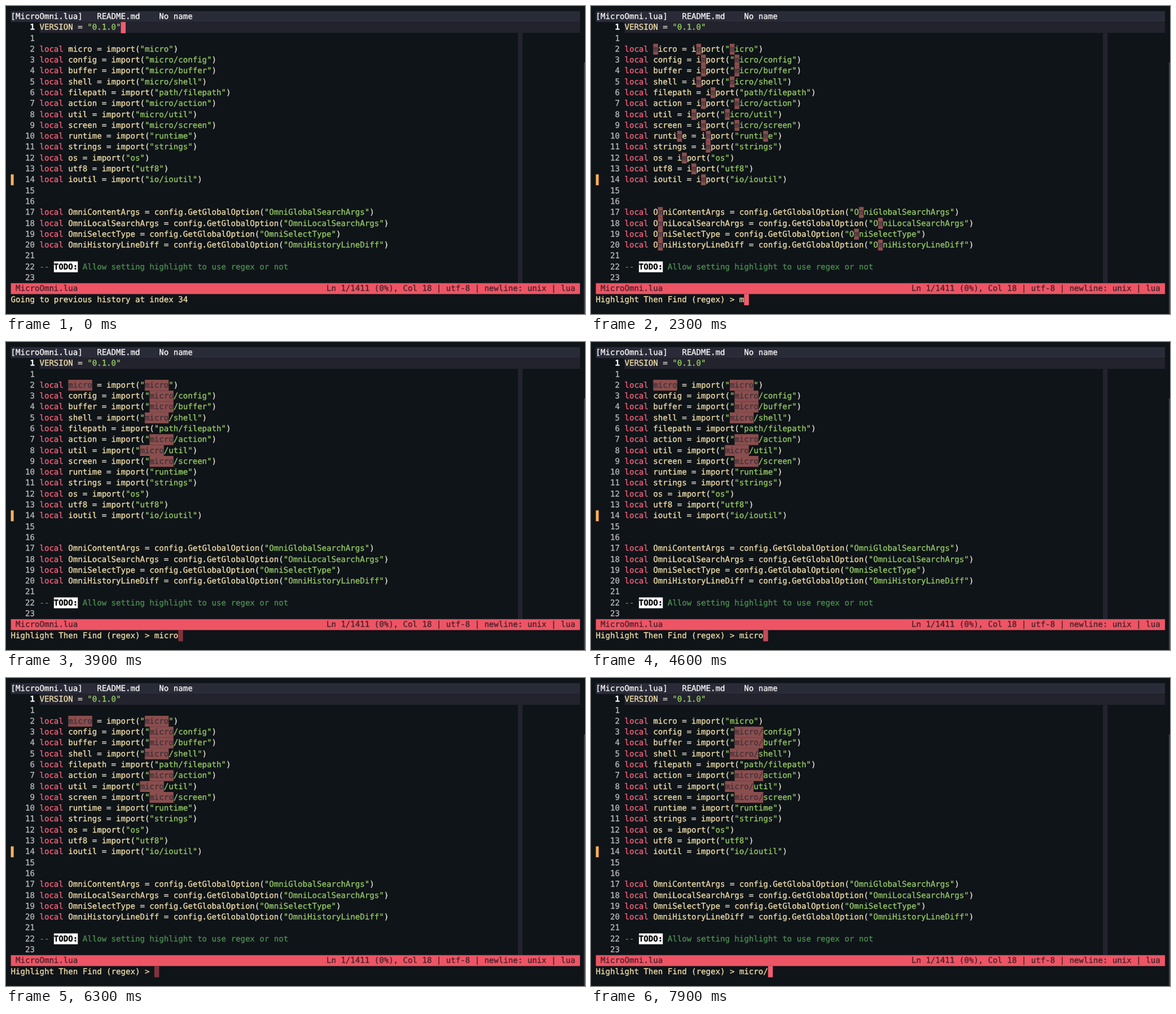
These frames come from a looping animation (1026x546 px, 8 s). An HTML page:

```html
<!DOCTYPE html>
<html lang="en">
<head>
<meta charset="utf-8">
<title>Highlight then find</title>
<style>
  html, body { margin: 0; width: 100%; height: 100%; overflow: hidden; background: #0f1418; }
  svg { display: block; width: 1026px; height: 546px; }
  text {
    font: 14.07px "DejaVu Sans Mono", "Liberation Mono", monospace;
    white-space: pre;
    text-rendering: geometricPrecision;
    stroke-width: 0.35px;
  }
  .bold { font-weight: bold; }
</style>
</head>
<body>
<svg id="stage" viewBox="0 0 1026 546">
  <g id="base"></g>
  <g id="matches"></g>
  <g id="message"></g>
  <rect id="cursor"></rect>
</svg>
<script>
const LEFT = 8.6, TOP = 9.1, CELL_W = 8.475, CELL_H = 19.29, BASELINE = 13.9;
const COLS = 119, CODE_COL = 6, STATUS_ROW = 25, MESSAGE_ROW = 26;
const LOOP = 8000, STEP = 100, FADE = 800;

const COLOR = {
  bar: '#2a2b38', line: '#22232d', status: '#ed5565', statusText: '#4a2029',
  plain: '#e4dfcf', name: '#ecdba6', keyword: '#f0607a', string: '#93c763',
  comment: '#4b8a50', number: '#b4b6b8', white: '#f4f4f4',
  match: '#8a4e4e', matchText: '#41323a', change: '#ffb257', edge: '#3c4045'
};
const CURSOR_RGB = [242, 92, 108], BACK_RGB = [15, 20, 24], LINE_RGB = [34, 35, 45];

const load = (name, path) => `local ${name} = import("${path}")`;
const option = (name, key = name) => `local ${name} = config.GetGlobalOption("${key}")`;
const code = [
  'VERSION = "0.1.0"',
  '',
  load('micro', 'micro'),
  ...['config', 'buffer', 'shell'].map(n => load(n, 'micro/' + n)),
  load('filepath', 'path/filepath'),
  ...['action', 'util', 'screen'].map(n => load(n, 'micro/' + n)),
  ...['runtime', 'strings', 'os', 'utf8'].map(n => load(n, n)),
  load('ioutil', 'io/ioutil'),
  '',
  '',
  option('OmniContentArgs', 'OmniGlobalSearchArgs'),
  option('OmniLocalSearchArgs'),
  option('OmniSelectType'),
  option('OmniHistoryLineDiff'),
  '',
  '-- TODO: Allow setting highlight to use regex or not',
  ''
];

const PROMPT = 'Highlight Then Find (regex) > ';
const FOUND = '179 found and highlighted. Do FindNext/FindPrevious to go to the occurrences';
const ask = (at, typed, query = typed) => ({ at, message: PROMPT + typed, query, row: MESSAGE_ROW });
const tell = (at, message, query) => ({ at, message, query, row: 1 });

const events = [
  tell(0, 'Going to previous history at index 34', ''),
  ask(1100, ''),
  ask(2300, 'm'),
  ask(2600, 'mi'),
  ask(2800, 'mic'),
  ask(3000, 'micr'),
  ask(3300, 'micro'),
  tell(4700, FOUND, 'micro'),
  { ...ask(5600, '', 'micro'), hidden: true },
  ask(5700, '', 'micro'),
  ask(6400, 'm'),
  ask(6600, 'mi'),
  ask(6800, 'mic'),
  ask(6900, 'micr'),
  ask(7100, 'micro'),
  ask(7900, 'micro/')
];

const byId = id => document.getElementById(id);
const base = byId('base'), matches = byId('matches'), message = byId('message'), cursor = byId('cursor');
const colX = col => LEFT + col * CELL_W;
const rowY = row => TOP + row * CELL_H;

function setAll(node, attrs) {
  for (const key in attrs) node.setAttribute(key, attrs[key]);
}

function add(parent, tag, attrs, content = '') {
  const node = document.createElementNS('http://www.w3.org/2000/svg', tag);
  setAll(node, attrs);
  node.textContent = content;
  parent.append(node);
}

function box(parent, x, y, width, height, fill) {
  add(parent, 'rect', { x, y, width, height, fill });
}

function cells(parent, row, col, count, fill, rows = 1) {
  box(parent, colX(col), rowY(row), count * CELL_W, rows * CELL_H, fill);
}

// Every character sits on the terminal grid.
function write(parent, row, col, str, fill, cls = '') {
  if (!str) return;
  const x = [...str].map((_, i) => colX(col + i).toFixed(2)).join(' ');
  add(parent, 'text', { x, y: rowY(row) + BASELINE, fill, stroke: fill, class: cls }, str);
}

function tokenColor(token) {
  if (token.startsWith('--')) return COLOR.comment;
  if (token === 'local') return COLOR.keyword;
  if (token[0] === '"') return COLOR.string;
  return /^\w/.test(token) ? COLOR.name : COLOR.plain;
}

function drawBase() {
  cells(base, 0, 0, COLS, COLOR.bar);
  write(base, 0, 0, '[MicroOmni.lua]', COLOR.white);
  write(base, 0, 18, 'README.md', COLOR.white);
  write(base, 0, 31, 'No name', COLOR.white);

  cells(base, 1, CODE_COL, COLS - CODE_COL, COLOR.line);
  cells(base, 2, 106, 1, COLOR.line, 23);
  box(base, LEFT, rowY(15), 5, CELL_H, COLOR.change);
  box(base, 1024, 100, 2, 446, COLOR.edge);

  code.forEach((str, i) => {
    const label = String(i || 1);
    write(base, i + 1, 5 - label.length, label, i ? COLOR.number : COLOR.white, i ? '' : 'bold');
    for (const m of str.matchAll(/--.*|"[^"]*"|\w+|[^\w\s"]/g)) {
      write(base, i + 1, CODE_COL + m.index, m[0], tokenColor(m[0]));
    }
    const todo = str.indexOf('TODO:');
    if (todo >= 0) {
      cells(base, i + 1, CODE_COL + todo, 5, '#fff');
      write(base, i + 1, CODE_COL + todo, 'TODO:', '#0a0a0a', 'bold');
    }
  });

  cells(base, STATUS_ROW, 0, COLS, COLOR.status);
  write(base, STATUS_ROW, 1, 'MicroOmni.lua', COLOR.statusText);
  write(base, STATUS_ROW, 66, 'Ln 1/1411 (0%), Col 18 | utf-8 | newline: unix | lua', COLOR.statusText);
}

function drawMatches(query) {
  matches.replaceChildren();
  if (!query) return;
  code.forEach((str, i) => {
    for (let at = str.indexOf(query); at >= 0; at = str.indexOf(query, at + 1)) {
      cells(matches, i + 1, CODE_COL + at, query.length, COLOR.match);
      write(matches, i + 1, CODE_COL + at, query, COLOR.matchText);
    }
  });
}

// The cursor fades in linear light, so it looks brighter than its share.
function blend(from, to, share) {
  const mixed = from.map((v, i) =>
    Math.round((v ** 2.2 * share + to[i] ** 2.2 * (1 - share)) ** (1 / 2.2)));
  return `rgb(${mixed})`;
}

function drawCursor(state, elapsed) {
  const top = state.row === 1;
  const col = top ? CODE_COL + code[0].length : state.message.length;
  const share = state.hidden ? 0 : Math.abs(1 - (elapsed / FADE) % 2);
  setAll(cursor, {
    x: colX(col),
    y: rowY(state.row),
    width: CELL_W,
    height: CELL_H + 0.6,
    fill: blend(CURSOR_RGB, top ? LINE_RGB : BACK_RGB, share),
    visibility: share ? 'visible' : 'hidden'
  });
}

let shown = null;
function render(time) {
  const t = Math.floor((time % LOOP) / STEP) * STEP;
  const state = events.findLast(e => e.at <= t);
  if (state !== shown) {
    shown = state;
    drawMatches(state.query);
    message.replaceChildren();
    write(message, MESSAGE_ROW, 0, state.message, COLOR.name);
  }
  drawCursor(state, t - state.at);
}

drawBase();
render(0);
let start;
function tick(now) {
  start ??= now;
  render(now - start);
  requestAnimationFrame(tick);
}
requestAnimationFrame(tick);
</script>
</body>
</html>
```
